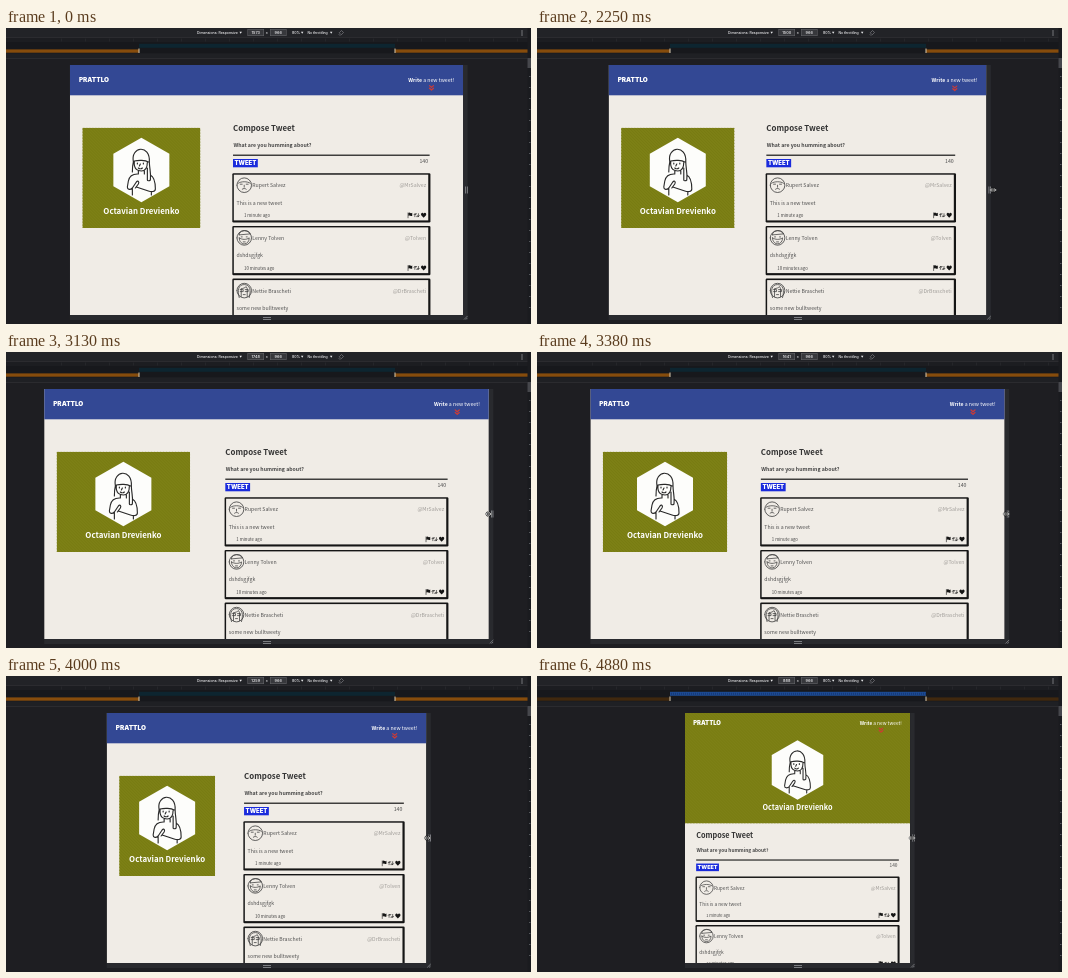
Recreate the animation shown at these times as an HTML page with a canvas. Size 525 px wide and 296 px high, loop 5010 ms.

```html
<!DOCTYPE html>
<html lang="en">
<head>
<meta charset="utf-8">
<title>Responsive page</title>
<style>
  html, body { margin: 0; width: 100%; height: 100%; overflow: hidden; background: #1e1e22; }
  canvas { display: block; width: 525px; height: 296px; }
</style>
</head>
<body>
<canvas id="stage"></canvas>
<script>
const LOOP = 5010, STEP = 125, LAST = 39;
const MID = 260.5, TOP = 37, BOTTOM = 287, BREAKPOINT = 256;
const SANS = '"Noto Sans CJK JP", "Noto Sans CJK SC", "Noto Sans", sans-serif';
const UI = 'Inter, Roboto, sans-serif';
const PAPER = '#f0ece6', OLIVE = '#7d8016', INK = '#151515';

// Viewport width in CSS pixels (four to one stage pixel) at given steps
const WIDTHS = [[0, 1573], [16, 1573], [18, 1500], [20, 1573], [22, 1798], [23, 1868], [24, 1850],
  [25, 1748], [27, 1641], [30, 1391], [35, 1060], [39, 888]];

const POSTS = [
  { name: 'Rupert Salvez', handle: '@MrSalvez', text: 'This is a new tweet', age: '1 minute ago',
    face: 'M-6 -2C-3 -4 3 -4 6 -2M-4 -1h2M2 -1h2M0 0v2M-2 4C-1 3 1 3 2 4' },
  { name: 'Lenny Tolven', handle: '@Tolven', text: 'dshdsgjfgk', age: '10 minutes ago',
    face: 'M-5 -3C-6 -8 5 -9 6 -4L-5 -3M-3 -1h1M2 -1h1M-5 0C-5 8 5 8 5 0C2 2 -2 2 -5 0M-1 4h2' },
  { name: 'Nettie Brascheti', handle: '@DrBrascheti', text: 'some new bulltweety', age: '12 minutes ago',
    face: 'M-5 7C-7 0 -6 -6 0 -6C6 -6 7 0 5 7M-3 6V-2C-1 -2 1 -3 2 -4L3 -2V6M-4 -1h3v2h-3M1 -1h3v2h-3M-1 4h2' }
];
const PORTRAIT = 'M-9 2C-9 -1 -9 -4 -8 -8C-11 -24 9 -26 8 -8C8 -1 10 3 9 10C8 11 6 11 6 10V-2' +
  'M-7 -9C-3 -10 4 -10 7 -8M-7 -9C-8 0 -3 1 0 1C4 1 6 -3 6 -8' +
  'M-4 -7v1M2 -7v1M-1 -6L-2 -4M-3 -2C-2 -1 0 -1 1 -2M-3 1V4M3 1V4' +
  'M-4 4C-9 4 -12 6 -13 11L-14 17C-14 20 -11 20 -9 18L-5 12C-3 10 -2 12 -3 14L-6 18' +
  'M9 5C13 7 14 14 14 19C14 22 10 22 7 21L-5 17M-9 18V25M10 22V25';

const canvas = document.getElementById('stage');
const c = canvas.getContext('2d');
const dpr = window.devicePixelRatio || 1;
canvas.width = 525 * dpr;
canvas.height = 296 * dpr;

function rect(x, y, w, h, color) {
  c.fillStyle = color;
  c.fillRect(x, y, w, h);
}

function at(x, y, scale, draw) {
  c.save();
  c.translate(x, y);
  c.scale(scale, scale);
  draw();
  c.restore();
}

function stroke(path, color, width) {
  c.strokeStyle = color;
  c.lineWidth = width;
  c.lineCap = c.lineJoin = 'round';
  c.stroke(new Path2D(path));
}

function fill(path, color) {
  c.fillStyle = color;
  c.fill(new Path2D(path));
}

// Set at four times the size and scaled down, for exact letter spacing
function text(s, x, y, size, color, align = 'left', weight = 400, family = SANS) {
  at(x, y, .25, () => {
    c.font = `${weight} ${size * 4}px ${family}`;
    c.textAlign = align;
    c.fillStyle = color;
    c.fillText(s, 0, 0);
  });
}

const textWidth = (s, size, weight) => {
  c.font = `${weight} ${size * 4}px ${SANS}`;
  return c.measureText(s).width / 4;
};

function widthAt(step) {
  const n = Math.max(0, Math.min(LAST, step));
  const i = Math.max(1, WIDTHS.findIndex(([s]) => s >= n));
  const [[s0, w0], [s1, w1]] = [WIDTHS[i - 1], WIDTHS[i]];
  return w0 + (w1 - w0) * (n - s0) / (s1 - s0);
}

function toolbar(label, mobile) {
  const ui = (s, x, size = 3.65, align = 'left') => text(s, x, 5.9, size, '#f2f2f4', align, 500, UI);
  const caret = x => fill(`M${x} 3.7h2.4l-1.2 2z`, '#f2f2f4');
  const input = (s, x) => {
    rect(x, 1, 16.5, 7, '#68696d');
    rect(x + .5, 1.5, 15.5, 6, '#37383c');
    ui(s, x + 8.2, 3.9, 'center');
  };
  rect(0, 0, 525, 9.5, '#222327');
  rect(0, 9.5, 525, 4.5, '#1c1d21');
  rect(0, 9.3, 525, .7, '#313236');
  for (let x = 55; x < 520; x += 24) rect(x, 10.5, .5, 3, '#2e3034');
  ui('Dimensions: Responsive', 191, 3.5);
  caret(233.5);
  input(label, 241.5);
  ui('×', 260.7, 3.75, 'center');
  input('966', 264);
  ui('80%', 286, 3.6);
  caret(295);
  ui('No throttling', 301.5, 3.4);
  caret(324);
  stroke('M333.5 4.5l2-2 2 2-2 2zM333 6.5l1 1', '#8b8c90', .6);
  for (const y of [2.5, 4.5, 6.5]) rect(515.5, y, 1, 1, '#c8c8cc');

  // Media query bars
  rect(0, 14, 525, 11.5, '#17181c');
  rect(133, 15.8, 256, 4, mobile ? '#1c4a92' : '#0d2530');
  if (mobile) for (let x = 134; x < 389; x += 2) rect(x, 16.8, 1, 2, '#163a78');
  const orange = mobile ? '#40280e' : '#864c0c';
  rect(0, 21.4, 133, 3.3, orange);
  rect(389, 21.4, 133, 3.3, orange);
  rect(132.5, 20.5, 1, 4.5, '#d8c9b0');
  rect(388.5, 20.5, 1, 4.5, '#d8c9b0');
  rect(0, 25.5, 525, 4.5, '#1f2024');
  rect(0, 30, 525, .7, '#313236');
  rect(521.5, 0, 3.5, 296, '#1a1b1f');
  rect(521.5, 30, 3.5, 10, '#46474c');
  for (let y = 48; y < 290; y += 11) rect(523, y, 1.5, 1, '#55575c');
}

function olive(x, y, w, h) {
  c.save();
  c.beginPath();
  c.rect(x, y, w, h);
  c.clip();
  rect(x, y, w, h, OLIVE);
  let lines = '';
  for (let d = -h; d < w; d += 3) lines += `M${x + d} ${y}l${h} ${h}`;
  stroke(lines, '#777a11', .8);
  c.restore();
}

function profile(x, y, k) {
  at(x, y, k, () => {
    fill('M0 -32.3L28 -16.2V16.2L0 32.3L-28 16.2V-16.2Z', '#fdfdfb');
    stroke(PORTRAIT, '#2a2a2a', 1.15);
    text('Octavian Drevienko', 0, 43.6, 7.9, '#fff', 'center', 700);
  });
}

function navigation(left, right, y, k, bounce) {
  at(left + 9 * k, y, k, () => text('PRATTLO', 0, 2.3, 6.4, '#fff', 'left', 900, UI));
  at(right - 9 * k, y, k, () => {
    const rest = ' a new tweet!';
    text(rest, 0, 2, 5.2, '#fff', 'right');
    text('Write', -textWidth(rest, 5.2, 400), 2, 5.2, '#fff', 'right', 700);
    stroke(`M-24.6 ${5.6 + bounce}l2 1.8 2-1.8m-4 2.6l2 1.8 2-1.8`, '#cf3a34', 1.2);
  });
}

function card(post, y, w) {
  c.fillStyle = INK;
  c.beginPath();
  c.roundRect(-.7, y - .5, w + 1.5, 49.3, 1.2);
  c.fill();
  rect(.8, y + 1, w - 2.2, 45.7, PAPER);
  at(11.2, y + 11.5, 1, () => {
    stroke('M-7.3 0a7.3 7.3 0 1 0 14.6 0a7.3 7.3 0 1 0 -14.6 0', '#3b3b3b', .8);
    stroke(post.face, '#3b3b3b', .75);
  });
  text(post.name, 19.3, y + 13.6, 5.2, '#505050');
  text(post.handle, w - 3.5, y + 13.6, 5.2, '#a09d99', 'right');
  text(post.text, 3.5, y + 31, 5.2, '#505050');
  text(post.age, 11, y + 43.1, 4.3, '#444');
  at(w, y + 41.5, 1, () => {
    stroke('M-21.6 -2.3V2.6', INK, .6);
    fill('M-21.3 -2.3q1.2 -.6 2.1 0t1.8 -.1v3q-.9 .6 -1.8 0t-2.1 0z', INK);
    stroke('M-14.8 1.5V-1.4H-13M-15.7 -.4l.9 -1 .9 1M-11.2 -1.5V1.4H-13M-12.1 .4l.9 1 .9 -1', INK, .6);
    fill('M-6 2.6L-8.4 0C-9.3 -2 -7 -3.3 -6 -1.5C-5 -3.3 -2.7 -2 -3.6 0Z', INK);
  });
}

function feed(x, y, width, k) {
  at(x, y, k, () => {
    const w = width / k;
    text('Compose Tweet', 0, 3, 7.9, '#333', 'left', 700);
    text('What are you humming about?', .4, 18.5, 5.2, '#444', 'left', 700);
    rect(0, 26.6, w, 1.2, INK);
    rect(0, 31, 24.8, 8.3, '#1a2bdc');
    text('TWEET', 12.4, 37.3, 5.9, '#fff', 'center', 900, UI);
    text('140', w - 1.5, 35, 5.2, '#505050', 'right');
    POSTS.forEach((post, i) => card(post, 45.7 + i * 52.7, w));
  });
}

function handles(left, right) {
  rect(right, TOP, 4.5, BOTTOM - TOP + 5, '#292a2e');
  rect(left, BOTTOM, right - left + 4.5, 5, '#292a2e');
  rect(right + 2.2, 158.5, .7, 7, '#a0a1a5');
  rect(right + 3.8, 158.5, .7, 7, '#a0a1a5');
  rect(257, 289.2, 8, .7, '#a0a1a5');
  rect(257, 291, 8, .7, '#a0a1a5');
  stroke(`M${right + 1.2} 291.2l3-3M${right + 3} 291.2l1-1`, '#a0a1a5', .6);
}

function cursor(step) {
  if (step < 1) return;
  const x = MID + 3.5 + Math.max(widthAt(step), widthAt(step + 1)) / 8;
  const away = Math.max(0, 1 - step / 4);
  at(x + away * 64, 162 - away * 40, 1, () => {
    const shape = 'M-2.6 0L-1 -1.6M-2.6 0L-1 1.6M-2.6 0H2.6M2.6 0L1 -1.6M2.6 0L1 1.6';
    stroke(shape, '#111', 1.5);
    stroke(shape, '#e8e8e8', .7);
  });
}

function page(w, step) {
  const left = MID - w / 2, right = MID + w / 2;
  const mobile = w < BREAKPOINT, k = mobile ? .92 : 1;
  const bounce = .5 * Math.sin(step * Math.PI / 4);
  c.save();
  c.beginPath();
  c.rect(left, TOP, w, BOTTOM - TOP);
  c.clip();
  rect(left, TOP, w, 250, PAPER);
  if (mobile) {
    olive(left, TOP, w, 110.5);
    profile(MID, 94, k);
    feed(left + w * .05, 159, w * .9, k);
  } else {
    rect(left, TOP, w, 30.3, '#334894');
    olive(left + 12.5, 99.7, w * .3, 100.3);
    profile(left + 12.5 + w * .15, 142, k);
    feed(left + 25.5 + w * .35, 100, w / 2, k);
  }
  navigation(left, right, mobile ? 47.3 : 52, k, bounce);
  c.restore();
}

function frame(now) {
  const step = Math.min(LAST, Math.floor(now % LOOP / STEP));
  const size = widthAt(step);
  // The page trails the pointer while shrinking
  const w = (size + .3 * Math.max(0, widthAt(step - 1) - size)) / 4;
  c.setTransform(dpr, 0, 0, dpr, 0, 0);
  rect(0, 0, 525, 296, '#1e1e22');
  toolbar(String(Math.round(size)), w < BREAKPOINT);
  handles(MID - w / 2, MID + w / 2);
  page(w, step);
  cursor(step);
  requestAnimationFrame(tick);
}

const tick = () => frame(performance.now());
tick();
</script>
</body>
</html>
```
